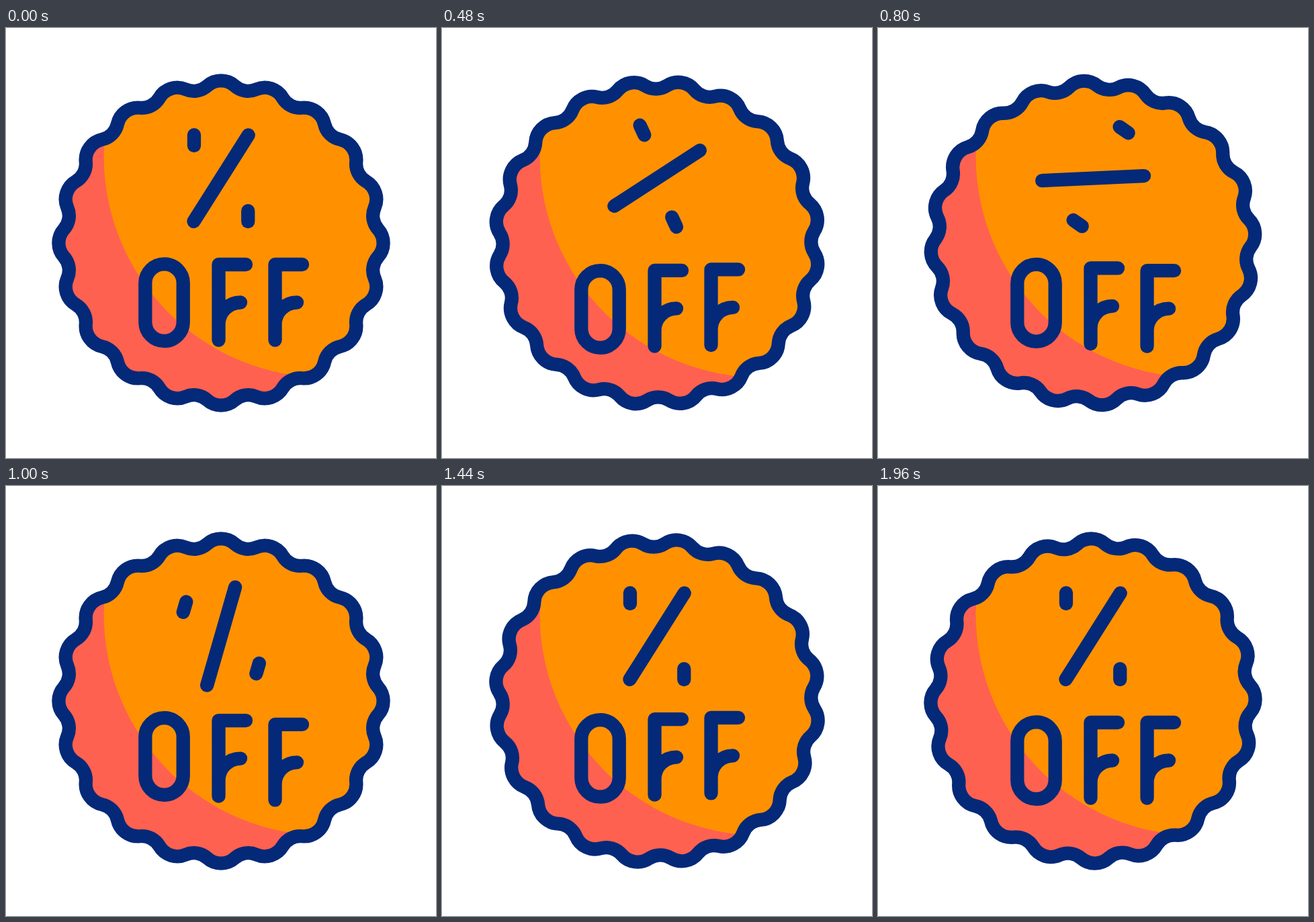
An HTML page for the animation above (2 s loop, 640 by 640 pixels).

```html
<!DOCTYPE html>
<html lang="en">
<head>
<meta charset="utf-8">
<title>Percent off badge</title>
<style>
  html, body { margin: 0; width: 100%; height: 100%; overflow: hidden; background: #fff; }
  svg { display: block; width: 100%; height: 100%; }
  .ink { fill: none; stroke: #042978; stroke-width: 20.3; stroke-linecap: round; stroke-linejoin: round; }
</style>
</head>
<body>
<svg viewBox="0 0 640 640">
  <defs>
    <clipPath id="inside"><path class="seal" /></clipPath>
  </defs>
  <g clip-path="url(#inside)">
    <rect width="640" height="640" fill="#ff6150" />
    <circle cx="474.6" cy="191" r="329" fill="#ff9100" />
  </g>
  <g class="ink">
    <path class="seal" />
    <path id="slash" d="M40.6 -64.2L-40.6 64.2" />
    <path class="dot" d="M0 -8V8" />
    <path class="dot" d="M0 -8V8" />
    <rect class="letter" x="207.3" y="351.3" width="56.4" height="114.6" rx="28.2" />
    <path class="letter" d="M316.5 464.6V352H357M349 408.5A32.5 32.5 0 0 0 316.5 441" />
    <path class="letter" d="M400.5 464.6V352H441M433 408.5A32.5 32.5 0 0 0 400.5 441" />
  </g>
</svg>
<script>
  const LOOP = 2000, STEP = 40, SCALLOPS = 20;
  const SIGN = { x: 320.1, y: 223.6 };
  const rad = deg => deg * Math.PI / 180;
  const all = selector => [...document.querySelectorAll(selector)];
  const seals = all('.seal'), dots = all('.dot'), letters = all('.letter');
  const slash = document.getElementById('slash');

  // Scalloped ring of tangent arcs, alternately bulging out and in.
  function sealPath() {
    const bump = 31, valley = 30;
    const bumpAt = 241.6 - bump, half = Math.PI / SCALLOPS;
    const valleyAt = 229.5 + valley;
    const dx = valleyAt * Math.sin(half);
    const dy = valleyAt * Math.cos(half) - bumpAt;
    const k = bump / Math.hypot(dx, dy);
    const px = dx * k, py = bumpAt + dy * k;
    const radius = Math.hypot(px, py), spread = Math.atan2(px, py);
    const point = a => `${320 + radius * Math.sin(a)} ${320 - radius * Math.cos(a)}`;
    let d = `M${point(-spread)}`;
    for (let i = 0; i < SCALLOPS; i++) {
      const a = 2 * half * i;
      d += `A${bump} ${bump} 0 0 1 ${point(a + spread)}`;
      d += `A${valley} ${valley} 0 0 0 ${point(a + 2 * half - spread)}`;
    }
    return d + 'Z';
  }

  // Smooth track through [times] and [values], flat at its ends and turning points.
  function track(times, values) {
    const last = times.length - 1;
    const rate = i => (values[i + 1] - values[i]) / (times[i + 1] - times[i]);
    const slopes = times.map((_, i) => {
      if (i === 0 || i === last) return 0;
      const a = rate(i - 1), b = rate(i);
      return a * b > 0 ? 2 * a * b / (a + b) : 0;
    });
    return t => {
      if (t <= times[0]) return values[0];
      if (t >= times[last]) return values[last];
      const i = times.findIndex(end => t < end) - 1;
      const span = times[i + 1] - times[i], u = (t - times[i]) / span, v = 1 - u;
      return values[i] * (1 + 2 * u) * v * v + values[i + 1] * u * u * (3 - 2 * u)
        + span * u * v * (slopes[i] * v - slopes[i + 1] * u);
    };
  }

  const spinTimes = [375, 640, 800, 1083];
  const spin = values => track(spinTimes, values);
  const turn = spin([0, 110.7, 235, 360]);
  const orbits = [
    { angle: spin([-125.4, -37.7, 108.9, 234.6]), radius: spin([69.3, 85.6, 70.8, 69.3]) },
    { angle: spin([54.6, 126.9, 302.6, 414.6]), radius: spin([69.3, 73.2, 85.4, 69.3]) }
  ];
  const bobs = [[0, 460, 1110, 1710], [0, 600, 1200, 1810], [0, 715, 1365, 1940]]
    .map(times => track(times, [0, 10, -7.5, 0]));

  function place(el, x, y, angle) {
    el.setAttribute('transform', `translate(${x} ${y}) rotate(${angle})`);
  }

  function draw(t) {
    // Two scallops per loop, so the ring repeats seamlessly.
    const roll = t / LOOP * 2 * 360 / SCALLOPS;
    seals.forEach(el => el.setAttribute('transform', `rotate(${roll} 320 320)`));
    const angle = turn(t);
    place(slash, SIGN.x, SIGN.y, angle);
    dots.forEach((el, i) => {
      const a = rad(orbits[i].angle(t)), r = orbits[i].radius(t);
      place(el, SIGN.x + r * Math.cos(a), SIGN.y + r * Math.sin(a), -angle);
    });
    letters.forEach((el, i) => place(el, 0, bobs[i](t), 0));
  }

  function tick() {
    const t = performance.now() % LOOP;
    draw(Math.floor(t / STEP) * STEP);
    requestAnimationFrame(tick);
  }

  seals.forEach(el => el.setAttribute('d', sealPath()));
  tick();
</script>
</body>
</html>
```
